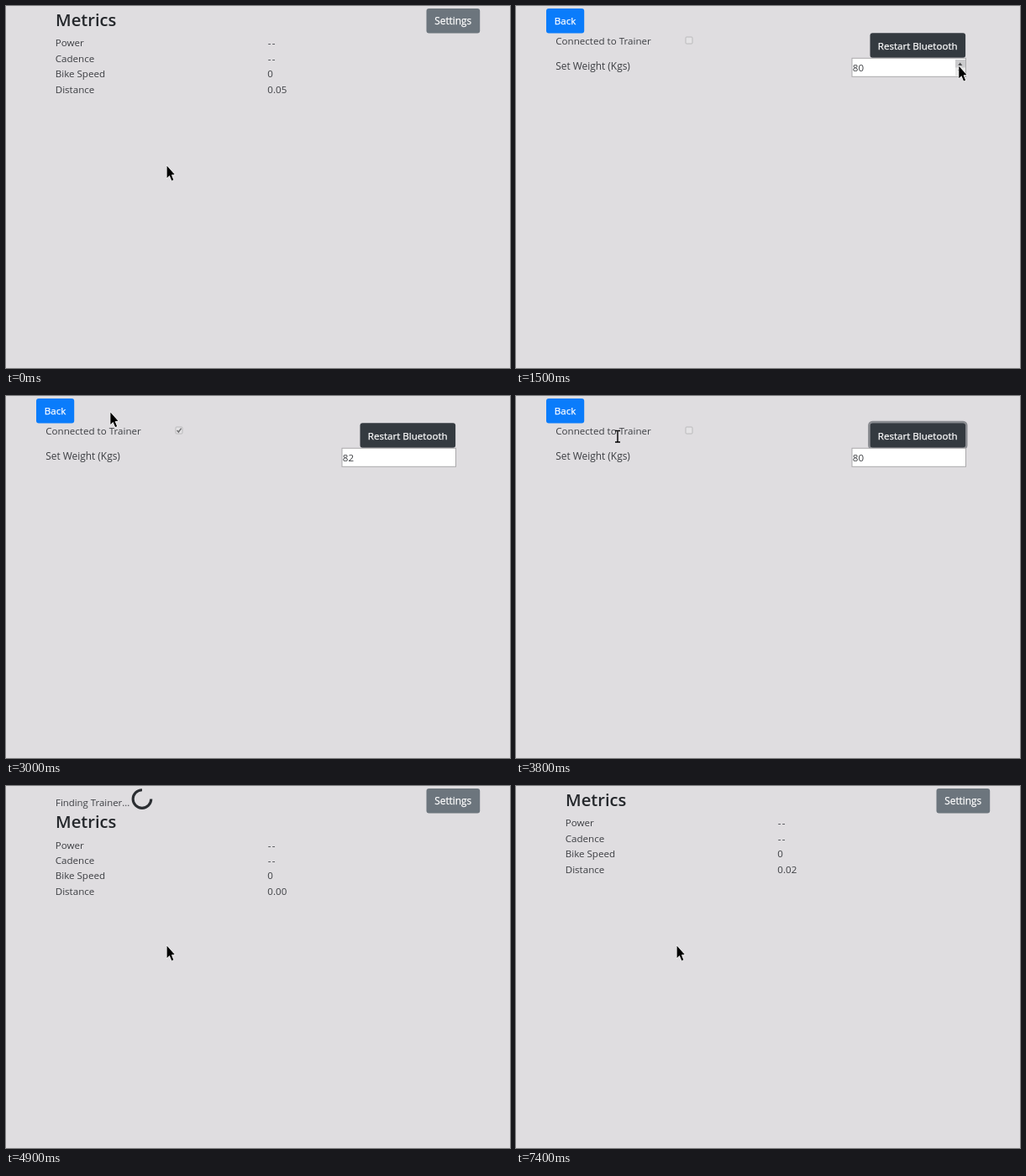
Animation, 600 px wide and 432 px high, one loop 8000 ms. Source, as an HTML page:

```html
<!DOCTYPE html>
<html lang="en">
<head>
<meta charset="utf-8">
<title>Bike metrics</title>
<style>
html, body { margin: 0; width: 100%; height: 100%; overflow: hidden; background: #dfdde0; }
svg { display: block; width: 600px; height: 432px; }
text { font: 11.6px "Open Sans", "Noto Sans", sans-serif; fill: #3c3e42; }
.title { font-size: 20.2px; font-weight: 600; fill: #25282c; }
.button { fill: #fff; stroke: #fff; stroke-width: .25; text-anchor: middle; }
.dash { letter-spacing: 1.2px; }
</style>
</head>
<body>
<svg viewBox="0 0 600 432">
  <g id="metrics">
    <g id="finding">
      <text x="59" y="24.2" style="font-size:11.4px">Finding Trainer...</text>
      <path id="spinner" d="M169.6 23.1A10.8 10.8 0 1 1 169.6 7.9" fill="none" stroke="#2b2e32" stroke-width="3.1"/>
    </g>
    <g id="table">
      <text class="title" x="59" y="24.2">Metrics</text>
      <text x="58.7" y="48.4">Power</text><text class="dash" x="311.8" y="48.4">--</text>
      <text x="58.7" y="66.9">Cadence</text><text class="dash" x="311.8" y="66.9">--</text>
      <text x="58.7" y="85.3">Bike Speed</text><text x="311.3" y="85.3">0</text>
      <text x="58.7" y="103.8">Distance</text><text id="distance" x="311.3" y="103.8"></text>
    </g>
    <rect id="settingsButton" x="500.5" y="3" width="63.7" height="29.5" rx="3"/>
    <text class="button" x="532.2" y="22.3" style="font-size:11.8px">Settings</text>
  </g>
  <g id="settings">
    <rect id="backButton" x="36" y="3" width="45.2" height="29.5" rx="3"/>
    <text class="button" x="58.6" y="22.3">Back</text>
    <text x="47.3" y="46.3">Connected to Trainer</text>
    <rect x="202" y="37" width="8" height="8" rx="1" fill="#e4e3e5" stroke="#bab9bb"/>
    <path id="tick" d="M203.6 41l1.8 2 3.2-4.4" fill="none" stroke="#707072" stroke-width="1.5"/>
    <text x="47.3" y="75.8" style="font-size:11.9px">Set Weight (Kgs)</text>
    <rect id="ring" x="420.3" y="31" width="116" height="32" rx="4" fill="none" stroke="#898b90" stroke-width="2.4"/>
    <rect id="restartButton" x="421.5" y="32.2" width="113.6" height="29.5" rx="3"/>
    <text class="button" x="478.2" y="51.7">Restart Bluetooth</text>
    <rect id="input" x="400" y="62.3" width="135.5" height="22" fill="#fff"/>
    <text id="weight" x="400.8" y="77.8"></text>
    <path id="caret" d="M414.5 66v15" stroke="#222"/>
    <g id="stepper">
      <path d="M523 64h12v19h-12z" fill="#e8e8e8"/>
      <path d="M523 64h12v9.5h-12z" fill="#cbcbcd"/>
      <path d="M526 71l2.7-3.5 2.7 3.5zM526 76l2.7 3.5 2.7-3.5z" fill="#505052"/>
    </g>
  </g>
  <path id="arrow" d="M.3 .8V15.2L3.4 12.3 6 18.4 8.1 17.5 5.6 11.5 9.4 11Z" stroke="#fff" stroke-width="1.2" paint-order="stroke"/>
  <path id="beam" d="M-3-6.5h2.2L0-6 .8-6.5H3M0-6V6.5M-3 7h2.2L0 6.5.8 7H3" fill="none" stroke="#000" stroke-width="1.4"/>
</svg>
<script>
const LOOP = 8000, STEP = 100;
const el = id => document.getElementById(id);
const show = (id, on) => el(id).style.display = on ? '' : 'none';
const paint = (id, color) => el(id).setAttribute('fill', color);
const move = (id, x, y) => el(id).setAttribute('transform', `translate(${x} ${y})`);

// time, x, y of the pointer
const path = [
  [0, 191.3, 190], [500, 533, 10], [800, 533, 10], [1200, 528, 103],
  [1500, 527, 71], [1600, 527, 71], [1700, 531.5, 66.5], [2300, 531.5, 66.5],
  [2700, 60, 14], [2900, 60, 14], [3300, 470, 44], [3400, 470, 44],
  [3800, 121, 48], [4000, 58, 16], [4500, 191.3, 190], [LOOP, 191.3, 190]
];

function pointer(t) {
  const i = path.findIndex(k => k[0] > t);
  const [t0, x0, y0] = path[i - 1], [t1, x1, y1] = path[i];
  const u = (t - t0) / (t1 - t0), e = u * u * (3 - 2 * u);
  return [x0 + (x1 - x0) * e, y0 + (y1 - y0) * e];
}

function draw(t) {
  const [x, y] = pointer(t);
  const over = (l, top, r, b) => x >= l && x <= r && y >= top && y <= b;
  const between = (a, b) => t >= a && t < b;
  const onSettings = between(800, 4100), finding = between(4100, 7200);
  const edited = between(2000, 3400), focused = between(2000, 2700);

  show('settings', onSettings);
  show('metrics', !onSettings);
  show('finding', finding);
  move('table', 0, finding ? 26.2 : 0);
  el('spinner').setAttribute('transform', `rotate(${(t - 4900) / 750 * 360 - 45} 162 15.5)`);
  el('distance').textContent = t < 800 ? '0.05' : t < 7200 ? '0.00' : t < 7400 ? '0.01678' : '0.02';

  paint('settingsButton', over(500, 3, 564, 32) ? '#5a6268' : '#6c757d');
  paint('backButton', over(36, 3, 81, 32) ? '#0069d9' : '#0a7cfb');
  paint('restartButton', over(421, 32, 535, 61) ? '#23272b' : '#343a40');

  show('tick', between(2100, 3400));
  show('ring', t >= 3400);
  show('caret', focused);
  show('stepper', focused || over(400, 62, 535, 84));
  el('input').setAttribute('stroke', focused ? '#dfa843' : '#aaa9ab');
  el('input').setAttribute('stroke-width', focused ? 1.5 : 1);
  el('weight').textContent = edited ? (t < 2200 ? 81 : 82) : 80;

  const overText = onSettings &&
    (over(47, 34, 161, 51) || over(47, 64, 137, 80) || over(400, 62, 522, 84));
  show('arrow', !overText);
  show('beam', overText);
  move('arrow', x, y);
  move('beam', x, y);
}

const start = performance.now();
function frame() {
  const t = (performance.now() - start) % LOOP;
  draw(Math.floor(t / STEP) * STEP);
  requestAnimationFrame(frame);
}
frame();
</script>
</body>
</html>
```
